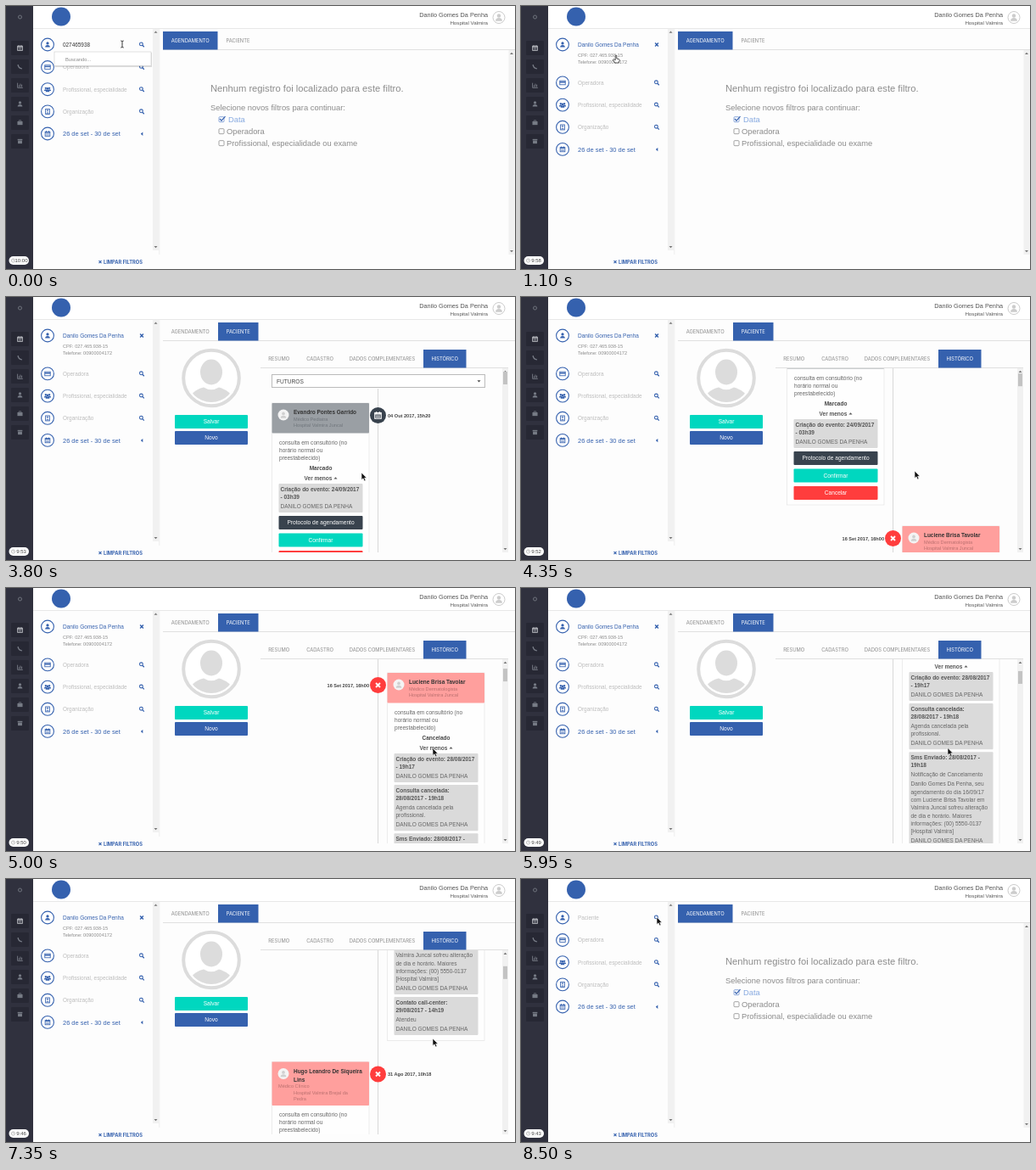
An HTML page that plays this animation: 600 px wide and 310 px high, repeating every 8550 ms.

```html
<!DOCTYPE html>
<html lang="pt-BR">
<head>
<meta charset="utf-8">
<title>Histórico do paciente</title>
<style>
html,body{margin:0;width:100%;height:100%;overflow:hidden;background:#fdfdfd}
svg{display:block;width:100vw;height:100vh}
text{font-family:"Liberation Sans",Arial,sans-serif;white-space:pre}
.i{font-family:Inter,sans-serif}
.b{font-weight:700}
.s{font-weight:600}
.m{text-anchor:middle}
.e{text-anchor:end}
.line{shape-rendering:crispEdges}
</style>
</head>
<body>
<svg id="stage" viewBox="0 0 600 310"></svg>
<script>
const LOOP = 8550, STEP = 50;
const BLUE = '#3561ae', TEAL = '#00d7bf', RED = '#ff3d3d', DARK = '#39434e', GREY = '#8b8b8b', PINK = '#ff9f9d';
const PATIENT = 'Danilo Gomes Da Penha', CLINIC = 'Hospital Valmira';

const text = (x, y, str, size, fill = '#555', cls = '') =>
  `<text x="${x}" y="${y}" font-size="${size}" fill="${fill}" class="${cls}">${str}</text>`;
const rect = (x, y, w, h, fill, extra = '') =>
  `<rect x="${x}" y="${y}" width="${w}" height="${h}" fill="${fill}" ${extra}/>`;
const frame = (x, y, x2, y2, stroke = '#d4d4d4') =>
  rect(x + .5, y + .5, x2 - x - 1, y2 - y - 1, '#fff', `class="line" stroke="${stroke}"`);
const circle = (x, y, r, fill, extra = '') => `<circle cx="${x}" cy="${y}" r="${r}" fill="${fill}" ${extra}/>`;
const path = (d, fill = 'none', stroke = 'none', width = 1) =>
  `<path d="${d}" fill="${fill}" stroke="${stroke}" stroke-width="${width}"/>`;
const group = (id, body, extra = '') => `<g id="${id}" ${extra}>${body}</g>`;
const at = (x, y, body, scale = 1) => `<g transform="translate(${x} ${y}) scale(${scale})">${body}</g>`;
const button = (x, y, w, label, fill) =>
  rect(x, y, w, 16, fill, 'rx="1"') + text(x + w / 2, y + 10.4, label, 6.6, '#fff', 'm');

// Icons, drawn around 0,0 in a box of about 7 px
const person = c => circle(0, -1.6, 1.7, c) + path('M-3 3.2Q-3 .4 0 .4T3 3.2Z', c);
const icons = {
  person,
  card: c => rect(-3.4, -2.4, 6.8, 4.9, 'none', `stroke="${c}" stroke-width=".9"`) + rect(-3.4, -1.4, 6.8, 1.5, c),
  people: c => at(-2.3, -.3, person(c), .7) + at(2.3, -.3, person(c), .7) + at(0, .5, person(c), .85),
  building: c => rect(-2.5, -3, 5, 6.3, 'none', `stroke="${c}" stroke-width=".9"`) +
    path('M-1.3-1.2H1.3M0-2.3V0M-1 3V1.5H1V3', 'none', c, .8),
  calendar: c => rect(-3, -2.4, 6, 5.4, 'none', `stroke="${c}" stroke-width=".9"`) +
    path('M-3-1.4H3M-1.5-3.5V-1.8M1.5-3.5V-1.8', 'none', c, 1) + path('M-2 .3H2M-2 1.6H2', 'none', c, .6),
  phone: c => path('M-2.5-2.5Q-2 2 2.5 2.5', 'none', c, 1.5),
  chart: c => path('M-3-3V3H3.5M-1.3 2V0M.4 2V-2M2.2 2V-1', 'none', c, 1),
  bag: c => rect(-3.2, -1.6, 6.4, 4.4, c) + path('M-1.3-1.6V-2.8H1.3V-1.6', 'none', c, .8),
  box: c => rect(-3, -2.8, 6, 1.6, c) + rect(-2.6, -.8, 5.2, 3.6, c),
  search: c => circle(-.6, -.6, 1.9, 'none', `stroke="${c}" stroke-width="1.1"`) + path('M.8.8L2.8 2.8', 'none', c, 1.3),
  cross: c => path('M-2-2L2 2M2-2L-2 2', 'none', c, 1.5),
};
const icon = (name, x, y, color = BLUE, scale = 1) => at(x, y, icons[name](color), scale);
const arrowUp = (x, y) => path(`M${x - 2} ${y + 1}L${x} ${y - 1.2}L${x + 2} ${y + 1}Z`, '#777');
const arrowDown = (x, y) => path(`M${x - 2} ${y - 1}L${x} ${y + 1.2}L${x + 2} ${y - 1}Z`, '#777');
const scrollbar = (x, y, y2) => rect(x, y, 7, y2 - y, '#f1f1f1') + arrowUp(x + 3.5, y + 4) + arrowDown(x + 3.5, y2 - 4);

function shell() {
  const side = ['calendar', 'phone', 'chart', 'person', 'bag', 'box'].map((name, i) =>
    rect(6, 41 + i * 22, 21, 17, '#272834', 'rx="1"') + icon(name, 16.5, 49.5 + i * 22, i ? '#767b85' : '#c2c4ca', .95)).join('');
  return rect(0, 0, 600, 310, '#fdfdfd') + rect(32, 0, 568, 26, '#fff') + rect(32, 26, 568, 1, '#e8e8e8') +
    rect(0, 0, 32, 310, '#30313e') + circle(16.5, 13, 2, 'none', 'stroke="#777b85" stroke-width=".9"') + side +
    circle(65, 12.5, 11, BLUE) +
    text(568, 13, PATIENT, 7.3, '#555', 'e') + text(568, 22.3, CLINIC, 6.2, '#555', 'e') +
    circle(581, 13.5, 7, '#fff', 'stroke="#ccc" stroke-width="1"') + icon('person', 581, 13.5, '#ccc', 1.3) +
    scrollbar(173, 26.8, 288) + rect(180.5, 27, .7, 266, '#e8e8e8') +
    icon('cross', 111, 301.6, BLUE, .75) + text(115, 303.8, 'LIMPAR FILTROS', 5.7, BLUE, 'i b') +
    rect(3.5, 295, 23.5, 10, '#fff', 'rx="5"') + circle(8.5, 300, 2.1, 'none', 'stroke="#999" stroke-width=".6"') +
    path('M8.5 298.8V300H9.5', 'none', '#999', .5) + '<text id="clock" x="18" y="302.2" font-size="6" fill="#444" class="m"></text>';
}

const rowIcon = (name, y) => circle(49, y, 7.4, '#fff', `stroke="${BLUE}" stroke-width="1.1"`) + icon(name, 49, y, BLUE, .95);

function filters() {
  const rows = [['card', 'Operadora'], ['people', 'Profissional, especialidade'], ['building', 'Organização']].map(([name, label], i) => {
    const y = 72 + i * 26.2;
    return rowIcon(name, y) + text(67, y + 2.4, label, 6.4, '#bdbdbd') + icon('search', 160, y);
  }).join('');
  const search = icon('search', 160, 45.5);
  return group('rows', rows + rowIcon('calendar', 150.5) + text(67, 153.2, '26 de set - 30 de set', 7.45, BLUE) +
      path('M161.3 148.5V152.9L158.8 150.7Z', BLUE)) +
    rowIcon('person', 45.5) +
    group('emptyRow', text(67, 47.9, 'Paciente', 6.4, '#bdbdbd') + search) +
    group('typedRow', text(67, 47.9, '027465938', 6.4, '#333') + search +
      rect(57.5, 55, 114.5, 17, '#000', 'opacity=".13"') + rect(57, 54, 114, 16.5, '#fff', 'stroke="#ccc" stroke-width=".6"') +
      '<text id="hint" x="70" y="64.6" font-size="5.7" fill="#888"></text>') +
    group('chosenRow', text(67, 48.4, PATIENT, 6.5, BLUE) + icon('cross', 160, 45.5, BLUE, .95) +
      text(67, 59.6, 'CPF: 027.465.938-15', 5.55, GREY) + text(67, 68, 'Telefone: 00900004172', 5.55, GREY));
}

const tab = (x, x2, y, label, state) =>
  (state === 'active' ? rect(x, y, x2 - x, 21.5, BLUE) : '') +
  text((x + x2) / 2, y + 12.9, label, 5.8, {active: '#fff', hover: '#444'}[state] || GREY, 'i m');

function agenda() {
  const option = (y, label, on) => rect(251, y - 6.3, 6, 6, '#fff', `rx="1" stroke="${on ? '#7f9fd6' : '#999'}" stroke-width=".9"`) +
    (on ? path(`M252 ${y - 4}L254 ${y - 1.8}L258.5 ${y - 6.8}`, 'none', BLUE, 1.2) : '') +
    text(on ? 262 : 260, y, label, 9.35, on ? '#86a9e0' : GREY);
  return tab(185, 249.5, 30, 'AGENDAMENTO', 'active') + tab(250, 297, 30, 'PACIENTE') + scrollbar(592.5, 52, 293) +
    text(241, 101, 'Nenhum registro foi localizado para este filtro.', 11.2, GREY) +
    text(241, 123.2, 'Selecione novos filtros para continuar:', 9.38, GREY) +
    option(137, 'Data', true) + option(151, 'Operadora') + option(165, 'Profissional, especialidade ou exame');
}

function profile() {
  return tab(185, 249.5, 30, 'AGENDAMENTO') + tab(250, 297.5, 30, 'PACIENTE', 'active') +
    circle(242, 95.5, 32.8, '#fff', 'stroke="#dcdcdc" stroke-width="4"') +
    '<clipPath id="face"><circle cx="242" cy="95.5" r="28.5"/></clipPath><g clip-path="url(#face)">' +
    '<ellipse cx="242" cy="88.5" rx="13" ry="15" fill="#dcdcdc"/>' +
    path('M214 129Q215 111 233 106.5Q242 112 251 106.5Q269 111 270 129Z', '#dcdcdc') + '</g>' +
    button(199, 139, 86, 'Salvar', TEAL) + button(199, 158, 86, 'Novo', BLUE) +
    rect(300, 83, 292, 1, '#e0e0e0') + scrollbar(585, 84, 301);
}

const subtabs = (active, hover) => [[299.5, 344, 'RESUMO'], [344, 396, 'CADASTRO'], [396, 491, 'DADOS COMPLEMENTARES'], [492, 542.5, 'HISTÓRICO']]
  .map(([x, x2, label]) => tab(x, x2, 62, label, label === active ? 'active' : label === hover ? 'hover' : '')).join('');

function summary() {
  const title = (x, y, label) => text(x, y, label, 5.65, '#8f8f8f', 'i s');
  const field = (x, x2, y, label, value = '', dx = 11) => frame(x, y, x2, y + 25, '#c9c9c9') +
    text(x + 6, y + 10.3, label, 5.15, '#333', 'i b') + text(x + dx, y + 19.8, value, 6.5, '#444');
  const star = x => text(x, 125, '*', 10, RED, 'm');
  return group('plainTabs', subtabs('RESUMO')) + group('hoverTabs', subtabs('RESUMO', 'DADOS COMPLEMENTARES')) +
    rect(586, 90, 5, 131, '#c3c3c3') +
    group('fields', '<g clip-path="url(#pane)">' +
      frame(300, 92, 578, 170) + title(306, 103, 'INFORMAÇÕES PESSOAIS') +
      field(306, 480, 113, 'NOME COMPLETO', PATIENT) + star(472) + field(486, 572, 113, 'CPF', '027.465.938-15') + star(564) +
      frame(306, 143, 572, 161) + rect(312.5, 150, 6.5, 6.5, '#fff', 'rx="1" stroke="#aaa" stroke-width=".8"') +
      title(321, 157.4, 'PACIENTE DEPENDENTE') +
      frame(300, 186, 578, 242) + title(306, 198.6, 'CONTATO') +
      field(306, 436, 208, 'E-MAIL') + field(442, 502, 208, 'CASA') + field(508, 572, 208, 'CELULAR', '(00) 90000-4172') +
      frame(300, 253, 578, 340) + title(306, 266, 'CONVÊNIOS') + frame(306, 277, 572, 340) +
      text(314, 289.3, 'OPERADORA', 5.1, '#999', 'i') + text(422, 289.3, 'NÚMERO DO CARTÃO', 5.1, '#999', 'i') + '</g>');
}

// Stacks grey event boxes; each event is [bold lines, ...paragraphs]
function events(x, top, list) {
  const leading = 9.3, paragraphGap = 11;
  let out = '';
  for (const paragraphs of list) {
    let y = top + 8.7, body = '';
    [...paragraphs, [PATIENT.toUpperCase()]].forEach((lines, p) => {
      if (p) y += paragraphGap - leading;
      for (const line of lines) { body += text(x + 2, y, line, 6.5, p ? '#666' : '#555', p ? '' : 'b'); y += leading; }
    });
    const bottom = y - leading + 5;
    out += rect(x, top, 99, bottom - top, '#dadada', 'rx="1"') + body;
    top = bottom + 3;
  }
  return out;
}

// A timeline entry drawn with its top edge at y = 0
function card({id, x, color, names, role, places, date, status, head, open, height, extra}) {
  const right = x > 438, last = 13 + (names.length - 1) * 10, mark = color === PINK ? RED : DARK;
  const sub = color === PINK ? '#b9706f' : '#70767c';
  return group(id,
    `<rect id="${id}Edge" x="${x}" y="0" width="114.5" height="${height}" fill="#fefefe" stroke="#e4e4e4" stroke-width=".7"/>` +
    rect(x, 0, 114.5, head, color, 'rx="1"') +
    circle(x + 13.5, 14, 6.5, '#f4f4f4') + icon('person', x + 13.5, 14.2, '#d0d0d0', 1.1) +
    names.map((n, i) => text(x + 25.5, 13 + i * 10, n, 6.45, '#333', 'b')).join('') +
    text(x + (names.length > 1 ? 7.5 : 25.5), last + 7.6, role, 5.6, sub) +
    places.map((p, i) => text(x + 25.5, last + 15.4 + i * 6.6, p, 5.6, sub)).join('') +
    circle(438.5, 14.5, 9.5, mark) + icon(mark === RED ? 'cross' : 'calendar', 438.5, 14.5, '#fff', 1.25) +
    text(right ? 428 : 450, 16.5, date, 5.6, '#444', right ? 'b e' : 'b') +
    ['consulta em consultório (no', 'horário normal ou', 'preestabelecido)'].map((line, i) => text(x + 8.5, head + 13 + i * 9.1, line, 6.55, '#666')).join('') +
    text(x + 57.5, head + 43, status, 6.5, '#444', 'b m') +
    `<text id="${id}More" x="${x + 54.5}" y="${head + 55}" font-size="6.5" fill="#555" class="b m"></text>` +
    `<g id="${id}Caret">${path('M-2 1L0-1.2L2 1Z', '#555')}</g>` +
    group(id + 'Open', (open ? events(x + 8, 95, open) : '') + (extra || '')));
}

const cards = [
  {id: 'first', x: 313.5, color: '#9a9fa4', names: ['Evandro Pontes Garrido'], role: 'Médico Pediatra', places: [CLINIC + ' Juncal'],
    date: '04 Out 2017, 15h20', status: 'Marcado', head: 35.5, height: 196, opens: 3300,
    open: [[['Criação do evento: 24/09/2017', '- 03h39']]],
    extra: button(321.5, 133, 99, 'Protocolo de agendamento', DARK) + button(321.5, 153.5, 99, 'Confirmar', TEAL) + button(321.5, 174, 99, 'Cancelar', RED)},
  {id: 'second', x: 449.5, color: PINK, names: ['Luciene Brisa Tavolar'], role: 'Médico Dermatologista', places: [CLINIC + ' Juncal'],
    date: '16 Set 2017, 16h00', status: 'Cancelado', head: 35.5, height: 355.5, opens: 4850,
    open: [
      [['Criação do evento: 28/08/2017', '- 19h17']],
      [['Consulta cancelada:', '28/08/2017 - 19h18'], ['Agenda cancelada pela', 'profissional.']],
      [['Sms Enviado: 28/08/2017 -', '19h18'], ['Notificação de Cancelamento'],
        [PATIENT + ', seu', 'agendamento do dia 16/09/17', 'com Luciene Brisa Tavolar em', 'Valmira Juncal sofreu alteração',
          'de dia e horário. Maiores', 'informações: (00) 5550-0137', `[${CLINIC}]`]],
      [['Contato call-center:', '29/08/2017 - 14h19'], ['Atendeu']]]},
  {id: 'third', x: 313.5, color: PINK, names: ['Hugo Leandro De Siqueira', 'Lins'], role: 'Médico Clínico', places: [CLINIC + ' Brejal da', 'Pedra'],
    date: '31 Ago 2017, 10h18', status: 'Cancelado', head: 51.5, height: 112, opens: Infinity},
];

const history = () => subtabs('HISTÓRICO') + '<g clip-path="url(#pane)">' +
  '<rect id="axis" x="438" width="1" height="220" fill="#d8d8d8"/>' +
  group('scroll', frame(313, 91, 565, 107, '#bbb') + text(319, 101.8, 'FUTUROS', 6.6, '#444') +
    path('M555.5 98.3H559.5L557.5 100.6Z', '#444') + cards.map(card).join('')) + '</g>' +
  '<rect id="thumb" x="586" y="88" width="5" height="15" fill="#c3c3c3"/>';

const cursors = group('arrow', path('M0 0V8.6L2 6.8L3.5 10L5 9.3L3.6 6.3H6.2Z', '#111', '#fff', .6)) +
  group('beam', path('M-1.7-4Q0-4 0-3V3Q0 4-1.7 4M1.7-4Q0-4 0-3M0 3Q0 4 1.7 4', 'none', '#222', .9)) +
  group('hand', path('M-.8-3.5Q0-4.6.8-3.5V0L3.6.7Q4.3 1 4 2.4L3.2 5H-1.3L-3.6 1.4Q-3-.2-.8 1.8Z', '#fff', '#222', .8));

const stage = document.getElementById('stage');
stage.innerHTML = '<clipPath id="pane"><rect x="299" y="84" width="286" height="217"/></clipPath>' +
  shell() + filters() + rect(185, 51, 415, 1, '#e0e0e0') +
  group('agenda', agenda()) + group('profile', profile() + group('summary', summary()) + group('history', history())) +
  group('cursor', cursors);

const el = id => document.getElementById(id);
const show = (id, on) => el(id).setAttribute('display', on ? 'inline' : 'none');
const move = (id, x, y) => el(id).setAttribute('transform', `translate(${x} ${y})`);

// Tables of [ms, value...], linear in between
const pointer = [[0, 137, 45], [400, 137, 45], [800, 112, 62], [1800, 112, 62], [1950, 300, 84], [2100, 479, 79], [2300, 517, 74], [2650, 512, 78],
  [2700, 505, 90], [3100, 386, 213], [3500, 386, 213], [3600, 419, 207], [3800, 419, 207], [4350, 464, 205], [4600, 503, 189],
  [7350, 503, 188], [7650, 330, 110], [8000, 160, 45], [LOOP, 160, 45]];
const scrolling = [[0, 0], [3800, 0], [4200, 76], [4350, 76], [4600, 246], [5450, 246], [5600, 290], [5800, 290], [5950, 342],
  [6000, 342], [6150, 400], [6250, 400], [6650, 511], [LOOP, 511]];
function sample(table, t) {
  const i = Math.max(1, table.findIndex(k => k[0] >= t)), a = table[i - 1], b = table[i];
  const p = (t - a[0]) / (b[0] - a[0]);
  return a.slice(1).map((v, j) => v + (b[j + 1] - v) * p);
}

function render(t) {
  const chosen = t >= 900 && t < 8150, onProfile = t >= 1150 && t < 8200, onHistory = t >= 2400;
  const hovering = t >= 2050 && t < 2200;
  const seconds = 600 - Math.floor(t / 500);
  el('clock').textContent = Math.floor(seconds / 60) + ':' + String(seconds % 60).padStart(2, '0');
  el('hint').textContent = t < 400 ? 'Buscando...' : PATIENT;
  show('typedRow', t < 900);
  show('chosenRow', chosen);
  show('emptyRow', t >= 8150);
  move('rows', 0, chosen ? 18.4 : 0);
  show('agenda', !onProfile);
  show('profile', onProfile);
  show('summary', !onHistory);
  show('plainTabs', !hovering);
  show('hoverTabs', hovering);
  show('fields', t >= 1450);
  show('history', onHistory);

  const [scroll] = sample(scrolling, t);
  move('scroll', 0, -scroll);
  move('thumb', 0, scroll * .029);
  el('axis').setAttribute('y', Math.max(84, 108 - scroll));
  let y = 125;
  for (const c of cards) {
    const open = t >= c.opens, height = open ? c.height : c.head + 60.5;
    move(c.id, 0, y);
    show(c.id + 'Open', open);
    el(c.id + 'Edge').setAttribute('height', height);
    el(c.id + 'More').textContent = open ? 'Ver menos' : 'Ver mais';
    el(c.id + 'Caret').setAttribute('transform', `translate(${c.x + 75} ${c.head + 53}) scale(1 ${open ? 1 : -1})`);
    y += height + 25;
  }

  const [px, py] = sample(pointer, t);
  const beam = t < 600, hand = (t >= 750 && t < 1800) || (t >= 2050 && t < 2700) || (t >= 3050 && t < 3550);
  move('cursor', px, py);
  show('beam', beam);
  show('hand', hand);
  show('arrow', !beam && !hand);
}

const start = performance.now();
function tick() {
  const t = (performance.now() - start) % LOOP;
  render(Math.floor(t / STEP) * STEP);
  requestAnimationFrame(tick);
}
tick();
</script>
</body>
</html>
```
